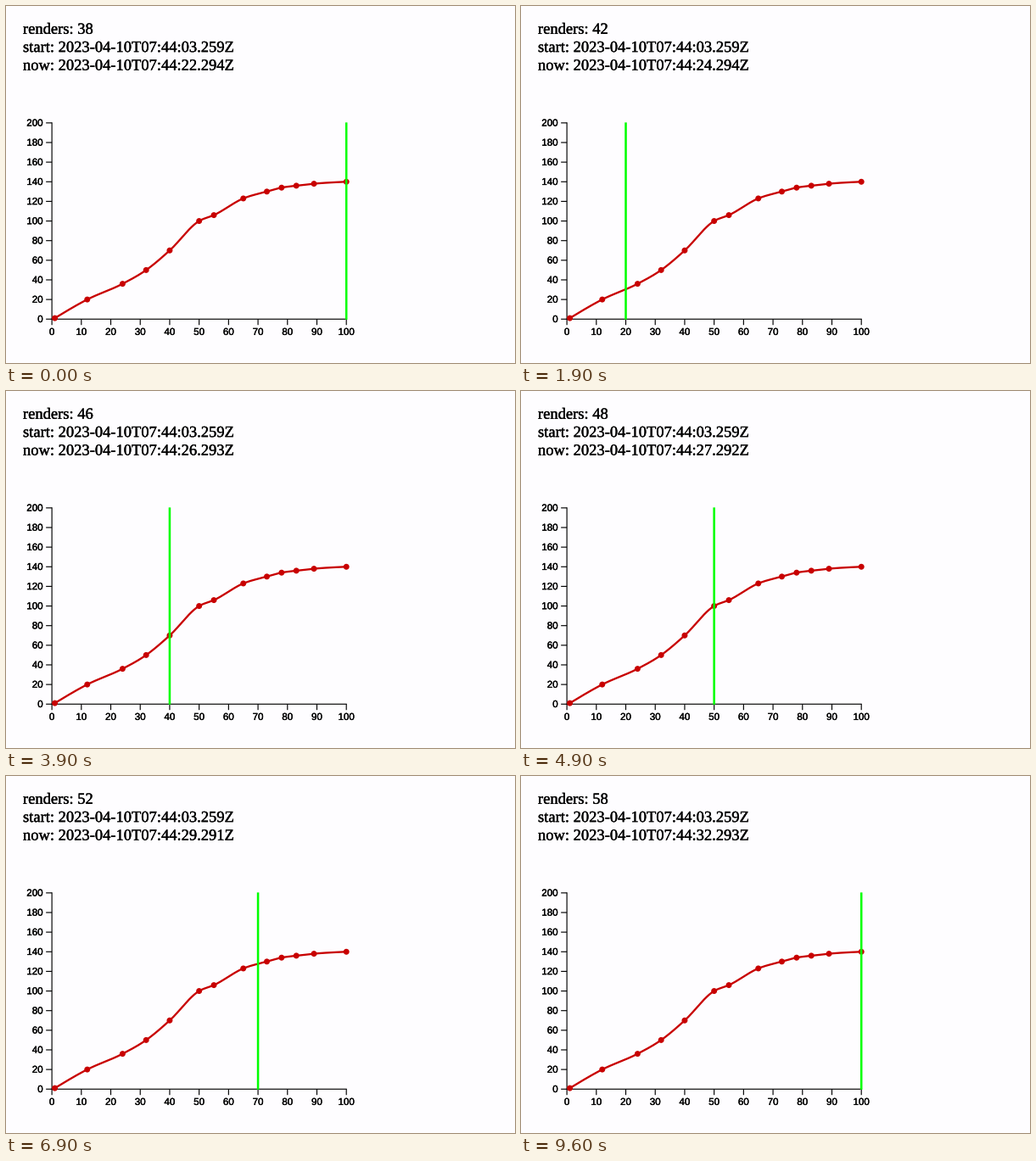
These frames come from a looping animation (600x421 px, 9.8 s). A matplotlib script:

```python
import numpy as np
import matplotlib.pyplot as plt
import matplotlib.patheffects as pe
from matplotlib.animation import FuncAnimation
from matplotlib.patches import Circle

W, H, DPI = 600, 421, 100
SCALE = 1.157          # CSS pixels to stage pixels
PT = 72 / DPI          # stage pixels to points
X0, Y0 = 54.1, 369.25  # chart origin
FRAMES, INTERVAL = 98, 100

BACK, INK, RED, GREEN = "#fefdff", "#000000", "#c80000", "#00ff00"

DATA = np.array([
    (1, 1), (12, 20), (24, 36), (32, 50), (40, 70), (50, 100), (55, 106),
    (65, 123), (73, 130), (78, 134), (83, 136), (89, 138), (100, 140),
], dtype=float)

MILLIS = [294, 293, 294, 296, 293, 292, 292, 291, 292, 293, 293]

plt.rcParams["text.hinting"] = "none"
fig = plt.figure(figsize=(W / DPI, H / DPI), dpi=DPI, facecolor=BACK)
ax = fig.add_axes([0, 0, 1, 1])
ax.set_xlim(0, W)
ax.set_ylim(H, 0)
ax.axis("off")

# A hairline around the glyphs gives the slightly heavy browser weight.
SMOOTH = [pe.withStroke(linewidth=0.35 * PT, foreground=INK)]


def px(x):
    return X0 + 3 * SCALE * x


def py(y):
    return Y0 - SCALE * y


def stroke(xs, ys, color, width, **kw):
    kw.setdefault("solid_capstyle", "butt")
    return ax.plot(xs, ys, color=color, lw=width * SCALE * PT,
                   snap=False, **kw)[0]


def label(x, y, text, size, family, ha="left"):
    return ax.text(x, y, text, fontsize=size * SCALE * PT, family=family,
                   color=INK, ha=ha, va="baseline", path_effects=SMOOTH)


def header(row, text=""):
    return label(20, 32.7 + 18.5 * SCALE * row, text, 16, "Liberation Serif")


def monotone_curve(x, y, steps=24):
    """Cubic Hermite curve that never overshoots its points."""
    h = np.diff(x)
    s = np.diff(y) / h
    p = (s[:-1] * h[1:] + s[1:] * h[:-1]) / (h[:-1] + h[1:])
    inner = 2 * np.minimum(np.minimum(s[:-1], s[1:]), p / 2)
    m = np.concatenate([[(3 * s[0] - inner[0]) / 2], inner,
                        [(3 * s[-1] - inner[-1]) / 2]])
    t = np.linspace(0, 1, steps)[None, :]
    a, b = y[:-1, None], y[1:, None]
    ma, mb, w = m[:-1, None], m[1:, None], h[:, None]
    ys = ((2 * t**3 - 3 * t**2 + 1) * a + (t**3 - 2 * t**2 + t) * w * ma
          + (3 * t**2 - 2 * t**3) * b + (t**3 - t**2) * w * mb)
    xs = x[:-1, None] + w * t
    return xs.ravel(), ys.ravel()


def draw_axes():
    tick, gap = 6 * SCALE, 9 * SCALE
    stroke([X0, X0], [py(200), Y0], INK, 1, solid_capstyle="projecting")
    stroke([X0, px(100)], [Y0, Y0], INK, 1, solid_capstyle="projecting")
    for v in range(0, 101, 10):
        stroke([px(v)] * 2, [Y0, Y0 + tick], INK, 1)
        label(px(v), Y0 + gap + 7.1 * SCALE, str(v), 10, "Liberation Sans", "center")
    for v in range(0, 201, 20):
        stroke([X0 - tick, X0], [py(v)] * 2, INK, 1)
        label(X0 - gap, py(v) + 3.2 * SCALE, str(v), 10, "Liberation Sans", "right")


def draw_series():
    xs, ys = monotone_curve(*DATA.T)
    stroke(px(xs), py(ys), RED, 2, solid_joinstyle="round")
    for x, y in DATA:
        ax.add_patch(Circle((px(x), py(y)), 3 * SCALE, fc=RED, lw=0, zorder=3))


draw_axes()
draw_series()
cursor = stroke([0, 0], [py(200) - 0.5, Y0 + 0.6], GREEN, 2.2, zorder=4)

renders = header(0)
header(1, "start: 2023-04-10T07:44:03.259Z")
now = header(2)


def update(frame):
    tick = (frame + 9) // 10   # the clock ticks once a second, 100 ms in
    x = px(10 * tick if tick else 100)
    cursor.set_xdata([x, x])
    renders.set_text(f"renders: {38 + 2 * tick}")
    now.set_text(f"now: 2023-04-10T07:44:{22 + tick}.{MILLIS[tick]}Z")
    return cursor, renders, now


anim = FuncAnimation(fig, update, frames=FRAMES, interval=INTERVAL,
                     repeat=True, repeat_delay=0, blit=False)
plt.show()
```
